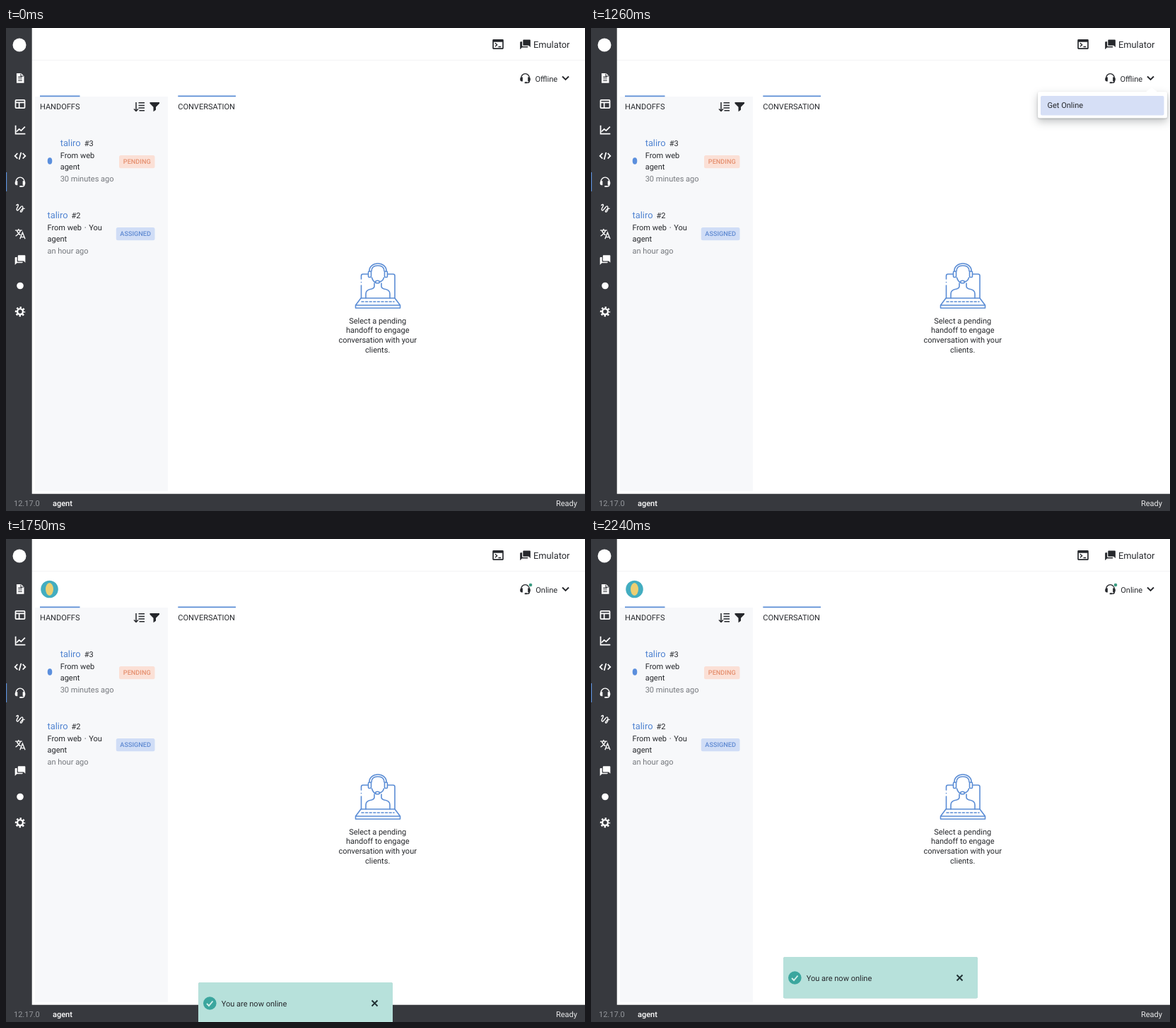
An HTML page that plays this animation: 819x683 px, repeating every 2380 ms.

```html
<!DOCTYPE html>
<html lang="en">
<head>
<meta charset="utf-8">
<title>Handoffs</title>
<style>
  html, body { margin: 0; width: 100%; height: 100%; overflow: hidden; background: #fff; }
  svg { display: block; width: 819px; height: 683px; }
  text { font: 11px Roboto, sans-serif; fill: #26282c; text-rendering: geometricPrecision; }
  .big { font-size: 12.83px; }
  .name { font-size: 12.83px; fill: #4f83d1; }
  .muted { fill: #75787d; }
  .tag { font-size: 9.17px; font-weight: 500; }
  .line { fill: none; stroke: currentColor; stroke-width: 1.9; }
  .thin { stroke-width: 1.5; }
  .icon { fill: currentColor; }
  .art { fill: none; stroke: #5b8dd5; stroke-width: 1.6; stroke-linecap: round; stroke-linejoin: round; }
  #menu .panel { filter: drop-shadow(0 1px 1px rgba(16,22,26,.22)) drop-shadow(0 5px 6px rgba(16,22,26,.25)); }
  #toast .panel { filter: drop-shadow(0 0 .6px rgba(16,60,55,.3)); }
</style>
</head>
<body>
<svg viewBox="0 0 819 683">
  <defs>
    <!-- Icons are drawn in a 16-unit box around the origin -->
    <g id="document">
      <path class="icon" d="M-5.5-7.5h7l4.500 4.500v10.500h-11.500z"/>
      <path d="M-3-1.500h6M-3 1.300h6M-3 4.100h6M1-7v4h4.500" fill="none" stroke="#37393e" stroke-width="1.200"/>
    </g>
    <g id="layout" class="line"><rect x="-7.100" y="-6.200" width="14.200" height="12.400" rx="1"/><path d="M-7-2.300h14M-1.500-2v8"/></g>
    <g id="chart" class="line"><path d="M-7-7v13h15M-5.500 2.500l4-4 3 2.500L7.500-5"/></g>
    <g id="code" class="line"><path d="M-4-4l-4 4 4 4M4-4l4 4-4 4M1.500-5.500l-3 11"/></g>
    <g id="headset">
      <path class="line thin" d="M-6.500 0a6.500 7 0 0 1 13 0M6.500 4q0 3-3 3H2"/>
      <path class="icon" d="M-4-1.500v6.500h-1.500Q-8 5-8 1.700T-5.500-1.500zM4-1.500v6.500h1.500Q8 5 8 1.700T5.500-1.500z"/>
      <rect class="icon" x="-1" y="5.800" width="4" height="2.200" rx="1"/>
    </g>
    <g id="gesture" class="line thin"><path d="M-6-3.400C-4.500-5.600-2.900-5.800-2.800-4S-6.400 1-5 3.400-1 .800 .800-1.200 4-3.200 4.200-.400 .200 3.800 .400 5.600 4.200 6 4.300 1.200H7.200"/></g>
    <g id="translate" class="line thin">
      <path d="M-7.700-5.300H3M-2.400-7.500v2M.500-5C-1-1-4 1.500-7 3.600M-5-4.500C-3.500-1-1.500 .500 .500 2M-.200 8L3.700-2 7.600 8M1.200 5h5"/>
    </g>
    <g id="chat" class="icon">
      <path d="M-2.500-7H7q1 0 1 1v10.500L5.500 2H-2.500q-1 0-1-1v-7q0-1 1-1z"/>
      <path d="M-4.800-4H-7q-1 0-1 1V8l3-3H3q1 0 1-1v-.700h-7.500q-1.300 0-1.300-1.300z"/>
    </g>
    <g id="cog">
      <circle r="4.300" class="line" style="stroke-width:2.600"/>
      <circle r="6.600" class="line" style="stroke-width:2.500" stroke-dasharray="2.600 2.584" stroke-dashoffset="1.300"/>
    </g>
    <g id="console">
      <path class="icon" fill-rule="evenodd" d="M-7-7.500H7q1.500 0 1.500 1.500V6q0 1.500-1.500 1.500H-7Q-8.500 7.500-8.500 6V-6q0-1.500 1.500-1.500zM-6.700-3.500v9.200H6.700v-9.200z"/>
      <path class="line thin" d="M-4.500-2l3 2.800-3 2.800M.500 3.800h4"/>
    </g>
  </defs>

  <rect x="41" y="97" width="188" height="558" fill="#f7f8fa"/>
  <path d="M37 45.500H819" stroke="#f3f3f4"/>
  <path d="M0 0H36.700V658.700H819V683H0z" fill="#37393e"/>
  <rect y="204" width="1.200" height="27" fill="#5b8dd5"/>
  <circle cx="19" cy="24" r="9.500" fill="#fff"/>
  <g id="sidebar" color="#fff"><circle cx="20" cy="364.500" r="4.800" fill="#fff"/></g>

  <g color="#26282c">
    <use href="#console" transform="translate(696 23) scale(.917)"/>
    <use href="#chat" transform="translate(734.500 23) scale(.917)"/>
    <text class="big" x="746" y="27.500">Emulator</text>

    <rect id="hover" x="718" y="57" width="90" height="27.500" rx="2.500" fill="#e4e6ea"/>
    <use href="#headset" transform="translate(734.500 71) scale(.917)"/>
    <path class="line" d="M787 68.500l4.500 4.500 4.500-4.500"/>
    <text id="status" x="748.500" y="75.500"></text>

    <path class="line thin" d="M181 114.500l3 3 3-3M184 105v12M187.500 105.800h8.500M187.500 109.400h8.500M187.500 113h8.500M188.500 116.800h7.500"/>
    <path class="icon" d="M203.500 105h13.500v1.700l-5 5v4l-3.500 2.600v-6.600l-5-5z"/>
  </g>

  <path d="M48 96.300H104.500M243.300 96.300H325" stroke="#5b8dd5" stroke-width="1.800"/>
  <text x="48" y="115">HANDOFFS</text>
  <text x="243.300" y="115">CONVERSATION</text>

  <ellipse cx="62" cy="188" rx="3.300" ry="4.700" fill="#5b8fdd"/>
  <g id="handoffs"></g>

  <g class="art">
    <path d="M512 348h-7q-2.500 0-2.500 2.500v4.500M502.500 359.500v.100M502.500 364v18M540 348h7.500q2.500 0 2.500 2.500v31.500"/>
    <path d="M502 382h48l7.500 10v4h-63v-4zM494.500 392h63"/>
    <path d="M503 387h46" stroke-dasharray="3 2.600"/>
    <path d="M514 344v-1a12 10 0 0 1 24 0v1M517 344q0-8 9-8t9 8"/>
    <rect x="512.500" y="344" width="4" height="8.500" rx="1.500"/>
    <rect x="535.500" y="344" width="4" height="8.500" rx="1.500"/>
    <path d="M517.500 353q1.500 5 5 7M534.500 353q-1.500 5-6 6"/>
    <ellipse cx="525.500" cy="359" rx="3" ry="1.800"/>
    <path d="M521 361v4q0 3-4 4-8 1-8 7v6M531 361v4q0 3 4 4 8 1 8 7v6"/>
  </g>
  <g id="hint" text-anchor="middle"></g>

  <text x="11" y="676" style="fill:#94979c">12.17.0</text>
  <text x="66" y="676" style="fill:#fff;font-weight:500">agent</text>
  <text x="778" y="676" style="fill:#e8e9ea">Ready</text>

  <g id="online">
    <circle cx="61.500" cy="71" r="12.300" fill="#43adc0"/>
    <ellipse cx="61.500" cy="71" rx="5.500" ry="9" fill="#edcf72"/>
    <circle cx="742" cy="65" r="3" fill="#fff"/>
    <circle cx="742" cy="65" r="2.300" fill="#3c9b82"/>
  </g>

  <g id="menu">
    <rect class="panel" x="632" y="90" width="183" height="37.500" rx="2.500" fill="#fff"/>
    <path d="M784 91l9-7 9 7z" fill="#fff"/>
    <rect id="highlight" x="636" y="96" width="174.500" height="27.500" rx="2" fill="#d6dff6"/>
    <text x="645.500" y="113">Get Online</text>
  </g>

  <g id="toast">
    <rect class="panel" x="272" y="591" width="275" height="58.500" rx="2.500" fill="#b7e1db"/>
    <circle cx="288.300" cy="620.500" r="9.300" fill="#3ba69e"/>
    <path d="M284 621l3 3 5.500-6.500" class="line" color="#d5f0ea"/>
    <text x="304.800" y="624.500">You are now online</text>
    <path d="M517.500 616.500l8 8m0-8l-8 8" class="line" color="#203033"/>
  </g>
</svg>

<script>
const LOOP = 2380, TICK = 70;
const HOVER = 420, MENU = 770, HIGHLIGHT = 1260, CLICK = 1610, ONLINE = 1750;
const MENU_FADE = 100, TOAST_RISE = 230, TOAST_OFFSET = 36;
const el = id => document.getElementById(id);
const show = (id, on) => { el(id).style.display = on ? '' : 'none'; };

const sidebarIcons = ['document', 'layout', 'chart', 'code', 'headset', 'gesture', 'translate', 'chat', '', 'cog'];
el('sidebar').innerHTML += sidebarIcons.map((name, i) => name &&
  `<use href="#${name}" transform="translate(20 ${70.8 + i * 36.7}) scale(.917)"/>`).join('');

function handoff(x, y, number, origin, age, tag, tagX, tagFill, tagColor) {
  const width = 210.5 - tagX;
  return `<text class="name" x="${x}" y="${y}">taliro</text>
    <text x="${x + 34}" y="${y}">#${number}</text>
    <text x="${x}" y="${y + 17}">${origin}</text>
    <text x="${x}" y="${y + 33.3}">agent</text>
    <text class="muted" x="${x}" y="${y + 50}">${age}</text>
    <rect x="${tagX}" y="${y + 13}" width="${width}" height="18.300" rx="2.500" fill="${tagFill}"/>
    <text class="tag" text-anchor="middle" x="${tagX + width / 2}" y="${y + 25.3}" style="fill:${tagColor}">${tag}</text>`;
}
el('handoffs').innerHTML =
  handoff(76.7, 167, 3, 'From web', '30 minutes ago', 'PENDING', 160, '#fbe0d6', '#e58f6e') +
  handoff(58.5, 269, 2, 'From web <tspan dx="1">·</tspan> <tspan dx="1">You</tspan>',
    'an hour ago', 'ASSIGNED', 155.8, '#d0ddf6', '#5f8ad2');

el('hint').innerHTML = ['Select a pending', 'handoff to engage', 'conversation with your', 'clients.']
  .map((line, i) => `<text x="525.700" y="${417.7 + i * 13.75}">${line}</text>`).join('');

const bezier = (s, a, b) => 3 * (1 - s) ** 2 * s * a + 3 * (1 - s) * s * s * b + s ** 3;

// Springy rise with a slight overshoot
function overshoot(x) {
  if (x <= 0) return 0;
  if (x >= 1) return 1;
  let low = 0, high = 1;
  for (let i = 0; i < 20; i++) {
    const mid = (low + high) / 2;
    if (bezier(mid, .54, .38) < x) low = mid; else high = mid;
  }
  return bezier(low, 1.12, 1.11);
}

function draw(now) {
  const t = Math.floor(now % LOOP / TICK) * TICK;
  const online = t >= ONLINE;
  show('hover', t >= HOVER && t < MENU);
  show('menu', t >= MENU && t < CLICK + MENU_FADE);
  show('highlight', t >= HIGHLIGHT);
  show('online', online);
  show('toast', online);
  el('menu').style.opacity = Math.min(1, 1 - (t - CLICK) / MENU_FADE);
  el('status').textContent = online ? 'Online' : 'Offline';
  el('status').setAttribute('x', online ? 749.3 : 748.5);
  const offset = TOAST_OFFSET * (1 - overshoot((t - ONLINE) / TOAST_RISE));
  el('toast').setAttribute('transform', `translate(0 ${offset})`);
}

const start = performance.now();
function frame() {
  draw(performance.now() - start);
  requestAnimationFrame(frame);
}
frame();
</script>
</body>
</html>
```
